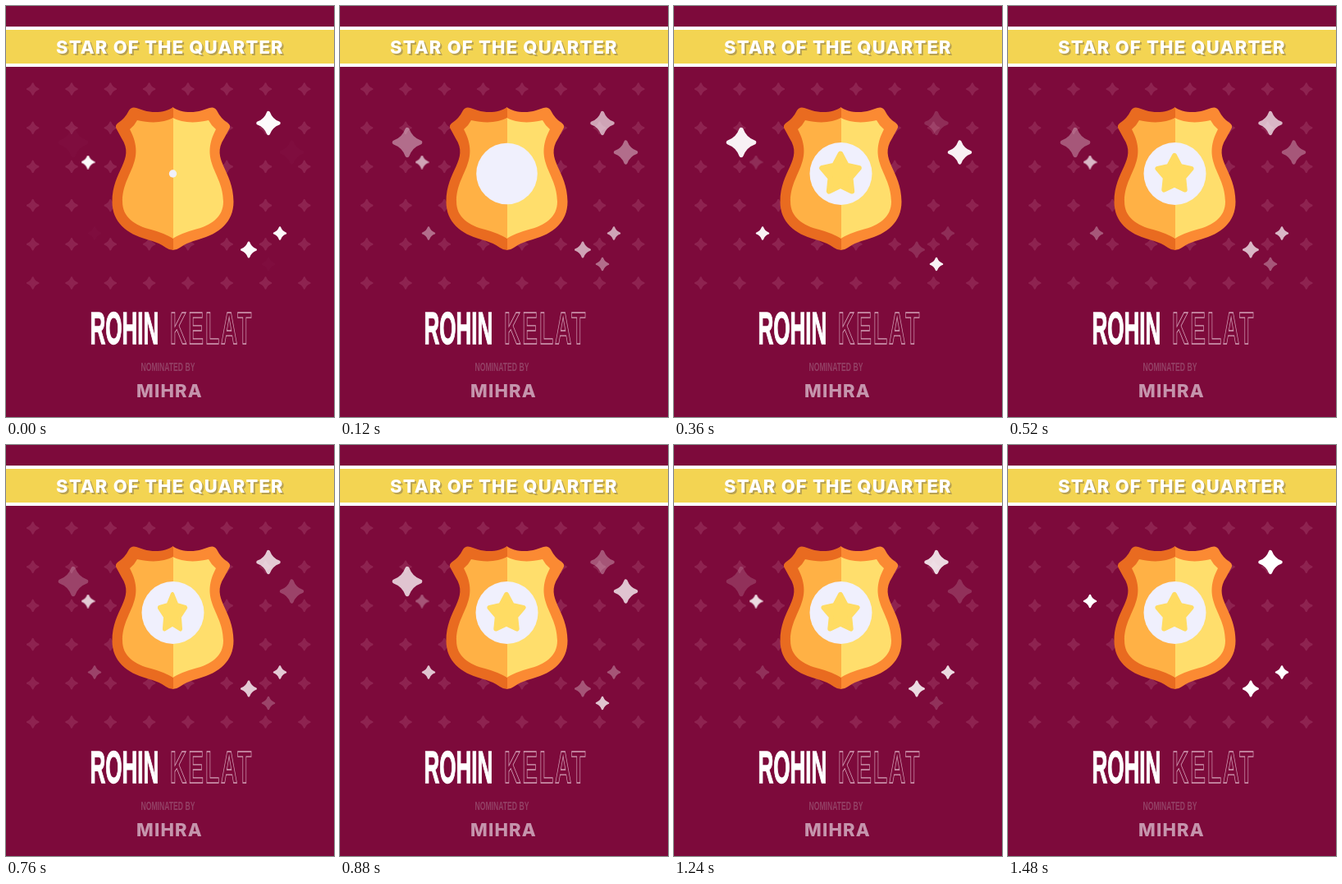
An HTML page that plays this animation: 400 px wide and 500 px high, repeating every 1.52 s.

```html
<!DOCTYPE html>
<html lang="en">
<head>
<meta charset="utf-8">
<title>Star of the quarter</title>
<style>
  html, body { margin: 0; height: 100%; overflow: hidden; background: #7d0a3b; }
  svg { display: block; width: 400px; height: 500px; }
  .wide { font: 800 22px Inter, sans-serif; text-anchor: middle; letter-spacing: 1.2px; }
  .tall { font: 700 56px "Liberation Sans", Arial, sans-serif; vector-effect: non-scaling-stroke; }
  .small { font-size: 15.4px; }
</style>
</head>
<body>
<svg viewBox="0 0 400 500">
  <defs>
    <path id="sparkle" d="M0-.83Q.22-.22 .83 0Q.22 .22 0 .83Q-.22 .22-.83 0Q-.22-.22 0-.83Z" stroke-width=".28" stroke-linejoin="round"/>
    <path id="rim" d="M204 123C196 129 181 131 168 127L159 124Q153 122 150 127Q145 137 137 142Q132 145 135 150L141 161C158 187 129.5 200 129.5 238C129.5 263 147 277 172 284Q187 288 195 294Q199 297 204 297Z"/>
    <path id="plate" d="M204 136C193 142 177 143 160 139Q157 145 151 150C172 190 142 203 142 238C142 257 157 267 177 272Q192 276 204 283Z"/>
  </defs>
  <rect width="400" height="500" fill="#7d0a3b"/>
  <g id="pattern" fill="#8e2350" stroke="#8e2350"></g>

  <rect y="25" width="400" height="49" fill="#fff"/>
  <rect y="29" width="400" height="41" fill="#f3d452"/>
  <g class="wide">
    <text x="202" y="60" fill="#b7a152">STAR OF THE QUARTER</text>
    <text x="200" y="58" fill="#fff">STAR OF THE QUARTER</text>
  </g>

  <use href="#rim" fill="#fb8a33" transform="translate(407) scale(-1 1)"/>
  <use href="#rim" fill="#e96b20"/>
  <use href="#plate" fill="#ffde6c" transform="translate(407) scale(-1 1)"/>
  <use href="#plate" fill="#ffb145"/>
  <circle id="disc" cx="203.5" cy="204" fill="#f0f0fd"/>
  <path id="star" fill="#ffdc63" stroke="#ffdc63" stroke-width="6" stroke-linejoin="round"/>

  <g id="first" fill="#fff" stroke="#fff"></g>
  <g id="second" fill="#fff" stroke="#fff"></g>

  <text class="tall" transform="translate(102.5 411) scale(.465 1)" fill="#fff" stroke="#fff" stroke-width="1.2">ROHIN</text>
  <text class="tall" transform="translate(200 411) scale(.5 1)" fill="none" stroke="#d5a5bb" letter-spacing="4">KELAT</text>
  <text class="tall small" transform="translate(164.5 444) scale(.56 1)" fill="#934065">NOMINATED BY</text>
  <text class="wide" x="199.5" y="476" fill="#c594ac">MIHRA</text>
</svg>
<script>
const LOOP = 1520, STEP = 40;
const $ = id => document.getElementById(id);
const clamp = v => Math.min(1, Math.max(0, v));
const span = (t, from, to) => clamp((t - from) / (to - from));
const smooth = p => p * p * (3 - 2 * p);
const easeOut = p => 1 - (1 - p) ** 2;
const easeInOut = p => p < .5 ? 2 * p * p : 1 - 2 * (1 - p) ** 2;

const sparkles = list => list.map(([x, y, r]) =>
  `<use href="#sparkle" transform="translate(${x} ${y}) scale(${r})"/>`).join('');

const grid = [];
for (let row = 0; row < 6; row++)
  for (let col = 0; col < 8; col++)
    grid.push([32.7 + col * 47.3, 101 + row * 47.2, 8]);
$('pattern').innerHTML = sparkles(grid);
$('first').innerHTML = sparkles([[100, 190, 8.5], [320, 142.5, 15.2], [334, 276.5, 8.5], [296, 296.5, 10.3]]);
$('second').innerHTML = sparkles([[82, 166, 18.8], [348.5, 178, 15.2], [108, 276.5, 8.5], [320, 314, 8.5]]);

const corners = Array.from({ length: 10 }, (_, i) => {
  const r = i % 2 ? 12.5 : 23, a = i * Math.PI / 5;
  return `${.94 * r * Math.sin(a)} ${-r * Math.cos(a)}`;
});
$('star').setAttribute('d', `M${corners.join('L')}Z`);

function draw(t) {
  // The two sparkle sets cross-fade twice, then the first one rests.
  const mix = t < 1330 ? (1 - Math.cos((t + 30) * Math.PI / 340)) / 2 : 0;
  $('first').setAttribute('opacity', 1 - .9 * mix);
  $('second').setAttribute('opacity', mix);

  // The disc and the star pop in with an overshoot; the star then turns over.
  $('disc').setAttribute('r', 4.7 + 38.8 * easeOut(span(t, 0, 200)) - 5.5 * smooth(span(t, 200, 360)));
  const size = 1.15 * easeOut(span(t, 220, 400)) - .15 * smooth(span(t, 400, 520));
  const turn = Math.cos(Math.PI * easeInOut(span(t, 520, 880)));
  $('star').setAttribute('transform', `translate(203 205) scale(${size * turn} ${size})`);
  $('star').setAttribute('visibility', size > 0 ? 'visible' : 'hidden');
}

const start = performance.now();
function tick() {
  const t = (performance.now() - start) % LOOP;
  draw(Math.floor(t / STEP) * STEP);
  requestAnimationFrame(tick);
}
tick();
</script>
</body>
</html>
```
